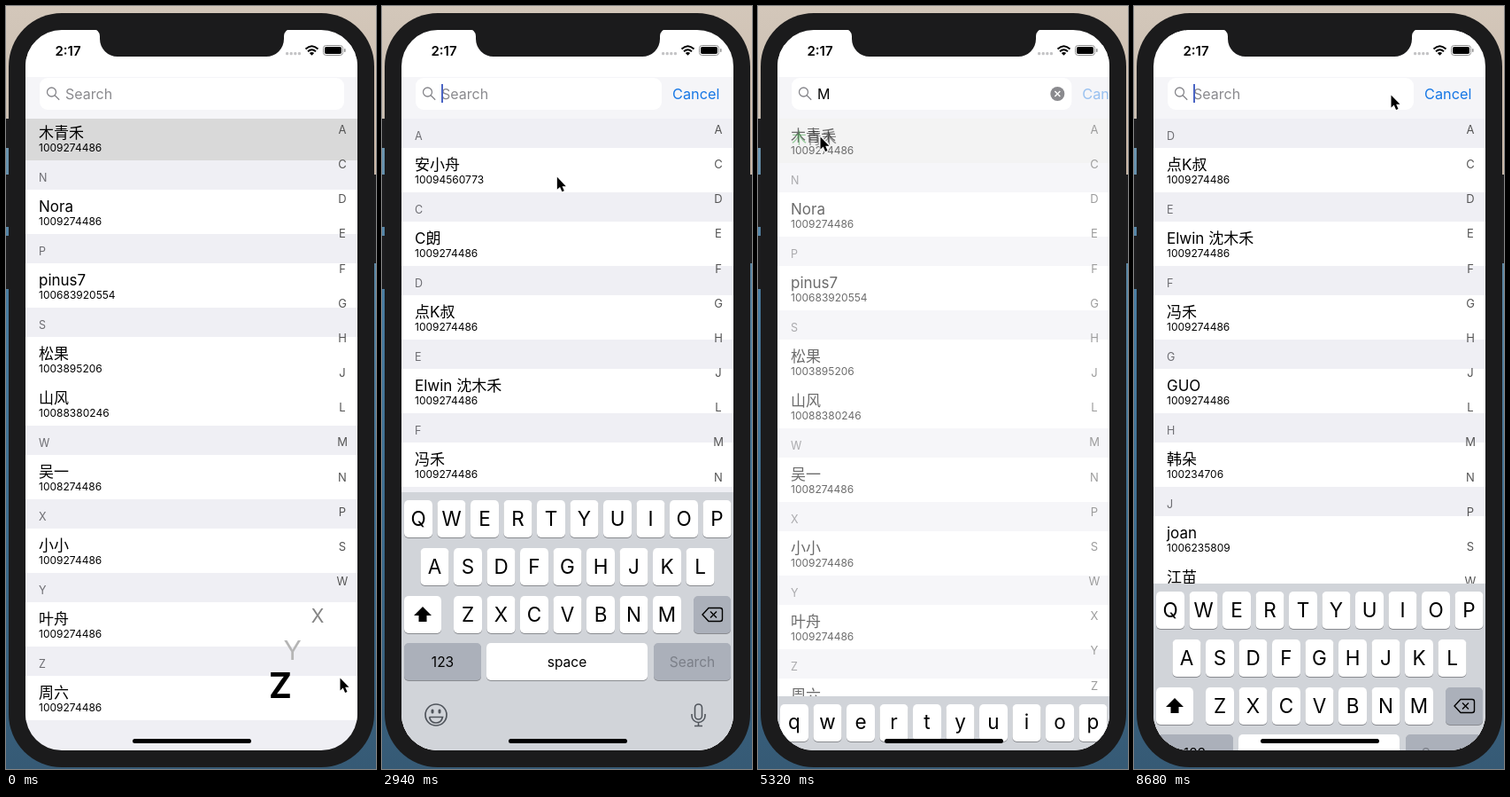
Animation of 418x860 px, one loop 8.82 s. Source, as an HTML page with a canvas:

```html
<!DOCTYPE html>
<html lang="zh-CN">
<head>
<meta charset="utf-8">
<style>
html, body { margin: 0; width: 100%; height: 100%; overflow: hidden; }
canvas { display: block; width: 418px; height: 860px; }
</style>
</head>
<body>
<canvas id="stage" width="418" height="860"></canvas>
<script>
const ctx = document.getElementById('stage').getContext('2d');
const LOOP = 8820, STEP = 140;
const FONT = 'Inter, "Noto Sans CJK SC", "Noto Sans CJK", sans-serif';
const GREY = '#efeff4', BAR = '#f5f5f8', TOP = 127, BOTTOM = 839;
const PHONE = '1009274486';

const contacts = {
  A: [['安小舟', '10094560773']],
  C: [['C朗', PHONE]],
  D: [['点K叔', PHONE]],
  E: [['Elwin 沈木禾', PHONE]],
  F: [['冯禾', PHONE]],
  G: [['GUO', PHONE]],
  H: [['韩朵', '100234706']],
  J: [['joan', '1006235809'], ['江苗', '100360998057']],
  L: [['lian', '100456148033']],
  M: [['木青禾', PHONE]],
  N: [['Nora', PHONE]],
  P: [['pinus7', '100683920554']],
  S: [['松果', '1003895206'], ['山风', '10088380246']],
  W: [['吴一', '1008274486']],
  X: [['小小', PHONE]],
  Y: [['叶舟', PHONE]],
  Z: [['周六', PHONE]]
};
const letters = Object.keys(contacts);
const starts = [];
let total = 0;
for (const l of letters) {
  starts.push(total);
  total += 33 + 50 * contacts[l].length;
}
const maxScroll = total - 678;
const matchScroll = starts[letters.indexOf('M')] + 33;
const indexY = i => 139.3 + i * 39.16;

// Keyframes: time, then values
const cursorKeys = [
  [0, 377, 757], [980, 375, 131], [1120, 375, 131], [1680, 178, 91], [2100, 178, 91],
  [2240, 174, 94], [2800, 174, 94], [3640, 314, 684], [4200, 314, 684], [5040, 70, 147],
  [5740, 70, 147], [6580, 377, 172], [6860, 372, 176], [7000, 349, 190], [7280, 372, 295],
  [7560, 374, 250], [7840, 374, 208], [7980, 372, 206], [8260, 290, 100]
];
const touchKeys = [
  [0, 774], [980, 131], [6800, 131], [6860, 178], [7000, 190], [7280, 300], [7560, 255], [7840, 217]
];
const bulgeKeys = [[1120, 1], [1400, 0], [6720, 0], [6860, 1], [7840, 1], [8120, 0]];

const clamp = (v, lo = 0, hi = 1) => Math.min(hi, Math.max(lo, v));
const easeOut = (u, power) => 1 - (1 - clamp(u)) ** power;
const sectionAt = touch => clamp(Math.round((touch - indexY(0)) / 39.16), 0, letters.length - 1);

function track(keys, t) {
  const i = keys.findIndex(k => k[0] > t);
  if (i < 0) return keys[keys.length - 1].slice(1);
  if (i === 0) return keys[0].slice(1);
  const a = keys[i - 1], b = keys[i], u = (t - a[0]) / (b[0] - a[0]);
  return a.map((v, j) => v + (b[j] - v) * u).slice(1);
}

function box(x, y, w, h, color, r = 0) {
  ctx.fillStyle = color;
  ctx.beginPath();
  ctx.roundRect(x, y, w, h, r);
  ctx.fill();
}

function text(s, x, y, size, color = '#000', align = 'left', weight = 400) {
  ctx.font = `${weight} ${size}px ${FONT}`;
  ctx.textAlign = align;
  ctx.fillStyle = color;
  ctx.fillText(s, x, y);
}

function stroke(d, color, width) {
  ctx.strokeStyle = color;
  ctx.lineWidth = width;
  ctx.stroke(new Path2D(d));
}

function fill(d, color) {
  ctx.fillStyle = color;
  ctx.fill(new Path2D(d));
}

function gradient(x, w, stops) {
  const g = ctx.createLinearGradient(0, 0, 0, 860);
  for (const [at, color] of stops) g.addColorStop(at, color);
  box(x, 0, w, 860, g);
}

function drawBackdrop() {
  gradient(0, 209, [[0, '#d3c7ba'], [.146, '#c9bdb0'], [.18, '#6d96b0'], [.35, '#4a7ea3'], [.7, '#3c6c8e'], [1, '#365a75']]);
  gradient(209, 209, [[0, '#d3c7ba'], [.215, '#cbb8a8'], [.34, '#5b87a5'], [.7, '#3c6c8e'], [1, '#365a75']]);
  for (const [x, y, h] of [[0, 127, 33], [0, 190, 59], [0, 259, 60], [414, 190, 100]]) box(x, y, 4, h, '#1d1d1f');
  box(3, 8, 413, 850, '#1b1b1c', 60);
}

function drawList(scroll, selection) {
  box(22, TOP, 375, BOTTOM - TOP, GREY);
  letters.forEach((letter, i) => {
    let y = TOP + starts[i] - scroll;
    text(letter, 37, y + 23.5, 12.5, '#6d6d72');
    y += 33;
    for (const [name, phone] of contacts[letter]) {
      box(22, y, 375, 50, '#fff');
      if (letter === 'M') box(22, y, 375, 50, `rgba(217,217,217,${selection})`);
      text(name, 37, y + 24.5, 17);
      text(phone, 37, y + 40, 12);
      y += 50;
    }
  });
}

function drawIndex(touch, bulge) {
  const active = sectionAt(touch);
  letters.forEach((letter, i) => {
    const y = indexY(i);
    const shift = bulge * 70 * Math.cos(Math.PI / 2 * clamp(Math.abs(y - touch) / 117));
    const picked = i === active && bulge > .99;
    const size = picked ? 39 : 13 + .3 * shift;
    const shade = picked ? 0 : 85 + 1.7 * shift;
    text(letter, 380 - (picked ? 70 : shift), y + size * .36, size, `rgb(${shade},${shade},${shade})`, 'center', picked ? 700 : 400);
  });
}

function drawResults(alpha) {
  ctx.globalAlpha = alpha;
  box(22, TOP, 375, BOTTOM - TOP, '#fff');
  const name = contacts.M[0][0];
  text(name[0], 38, 155, 17, '#1f9a2b');
  text(name.slice(1), 55, 155, 17);
  ctx.globalAlpha = 1;
}

function drawSearchBar(query, focused, closing) {
  box(22, 27, 375, 53, '#fff');
  box(22, 80, 375, TOP - 80, BAR);
  const right = 316 + 66 * closing;
  box(38, 81, right - 38, 36, '#fff', 9);
  stroke('M56.5 97a5 5 0 1 1-10 0a5 5 0 1 1 10 0M55.2 100.7l5 5', '#85858a', 1.3);
  text(query || 'Search', 67, 104.5, 16, query ? '#000' : '#8a8a8e');
  if (focused) box(query ? 83 : 67, 88, 2, 21, '#4a64c4');
  if (query) {
    const x = right - 16;
    box(x - 8, 91, 16, 16, '#8a8a8e', 8);
    stroke(`M${x - 3} 96l6 6m0-6l-6 6`, '#fff', 1.4);
  }
  ctx.globalAlpha = 1 - closing;
  text('Cancel', 328 + 66 * closing, 104.5, 16.3, '#1677e5');
  ctx.globalAlpha = 1;
}

function key(x, y, w, color = '#fff') {
  box(x, y + 1, w, 42, '#898b90', 5);
  box(x, y, w, 42, color, 5);
}

function drawKeyboard(top, query) {
  ctx.save();
  ctx.translate(0, top);
  box(22, 0, 375, 300, '#d1d4d9');
  const rows = [['QWERTYUIOP', 25, 9], ['ASDFGHJKL', 43.5, 63], ['ZXCVBNM', 81, 117]];
  for (const [chars, x0, y] of rows) {
    [...chars].forEach((c, i) => {
      const x = x0 + i * 37.5;
      key(x, y, 32);
      text(query ? c.toLowerCase() : c, x + 16, y + (query ? 27.5 : 29), 22.5, '#000', 'center');
    });
  }
  const dark = '#abb0ba';
  key(25, 117, 42, query ? dark : '#fff');
  const shift = 'M46 129l10 10h-5.500v7h-9v-7h-5.500z';
  if (query) stroke(shift, '#000', 1.4);
  else fill(shift, '#000');
  key(352, 117, 42, dark);
  stroke('M369 130.500h13q2.500 0 2.500 2.500v10q0 2.500-2.500 2.500h-13l-7-7.500zM371 134.500l7 7m0-7l-7 7', '#000', 1.4);
  key(25, 170, 87, dark);
  key(118, 170, 182);
  key(307, 170, 87, query ? '#007aff' : dark);
  text('123', 68.5, 197, 15.5, '#000', 'center');
  text('space', 209, 196.5, 15.5, '#000', 'center');
  text('Search', 350.5, 196.5, 15.5, query ? '#fff' : '#7b7f88', 'center');
  stroke('M73 251a12 12 0 1 1-24 0a12 12 0 1 1 24 0M53.500 253.500h15q-1.500 6.500-7.500 6.500t-7.500-6.500', '#50555c', 1.7);
  for (const x of [55.5, 63.5]) box(x, 244.5, 3, 5, '#50555c', 1.5);
  stroke('M353.500 243a4 4 0 0 1 8 0v9a4 4 0 0 1-8 0zM350 250v2a7.500 7.500 0 0 0 15 0v-2M357.500 259.500v4M353 263.500h9', '#50555c', 1.6);
  ctx.restore();
}

function drawKeyPopup() {
  ctx.save();
  ctx.shadowColor = 'rgba(0,0,0,.35)';
  ctx.shadowBlur = 5;
  ctx.shadowOffsetY = 1;
  fill('M301 599h42q8 0 8 8v39c0 12-13 10-13 24v32q0 5-5 5h-22q-5 0-5-5v-32c0-14-13-12-13-24v-39q0-8 8-8z', '#fff');
  ctx.restore();
  text('M', 322, 641, 36, '#000', 'center', 300);
}

function drawStatus() {
  text('2:17', 70, 55.5, 15, '#000', 'center', 600);
  for (let i = 0; i < 4; i++) box(316 + i * 4.6, 52, 3.2, 3.2, '#c4c4c6', 1.2);
  stroke('M338.500 48.500q7-6.500 14 0M341 51.300q4.500-4 9 0', '#000', 2);
  fill('M342.800 53q2.700-2.200 5.400 0l-2.700 2.700z', '#000');
  ctx.strokeStyle = '#8c8c8c';
  ctx.lineWidth = 1;
  ctx.beginPath();
  ctx.roundRect(358.5, 44.5, 22, 11, 3);
  ctx.stroke();
  box(360, 46, 19, 8, '#000', 1.8);
  box(382, 48, 1.5, 4, '#8c8c8c', 1);
}

function drawCursor(x, y) {
  ctx.save();
  ctx.translate(x, y);
  ctx.lineJoin = 'round';
  const arrow = 'M.5 .5v14l3.200-2.900 2.400 5.400 2.400-1-2.300-5.200h4.300z';
  stroke(arrow, '#fff', 2);
  fill(arrow, '#000');
  ctx.restore();
}

function scrollAt(t, touch) {
  if (t >= 5180 && t < 6860) return matchScroll;
  return Math.min(starts[sectionAt(touch)], maxScroll);
}

function draw(t) {
  const [touch] = track(touchKeys, t);
  const [bulge] = track(bulgeKeys, t);
  const query = t >= 4200 && t < 8540 ? 'M' : '';
  const focused = (t >= 2520 && t < 5180) || t >= 8540;
  const closing = focused ? 0 : t < 2520 ? 1 : easeOut((t - 5180) / 345, 1.67);
  const raised = t < 5180 ? easeOut((t - 2424.5) / 345, 3)
    : t < 8540 ? 1 - easeOut((t - 5180) / 345, 3)
    : easeOut((t - 8579) / 345, 3);

  drawBackdrop();
  ctx.save();
  ctx.beginPath();
  ctx.roundRect(22, 27, 375, 812, 41);
  ctx.clip();
  drawList(scrollAt(t, touch), t < 1120 ? 1 : t < 5180 ? 0 : closing);
  drawIndex(touch, bulge);
  if (query && closing < 1) drawResults(1 - closing);
  drawSearchBar(query, focused, closing);
  if (raised > 0) drawKeyboard(Math.round(BOTTOM - 291 * raised), query);
  if (t >= 3920 && t < 4200) drawKeyPopup();
  drawStatus();
  box(143, 826, 134, 5, '#000', 2.5);
  fill('M98 26a8 8 0 0 1 8 8v3a20 20 0 0 0 20 20h168a20 20 0 0 0 20-20v-3a8 8 0 0 1 8-8z', '#1b1b1c');
  ctx.restore();
  drawCursor(...track(cursorKeys, t));
}

function frame(now) {
  draw(Math.floor((now % LOOP) / STEP) * STEP);
  requestAnimationFrame(frame);
}
requestAnimationFrame(frame);
</script>
</body>
</html>
```
